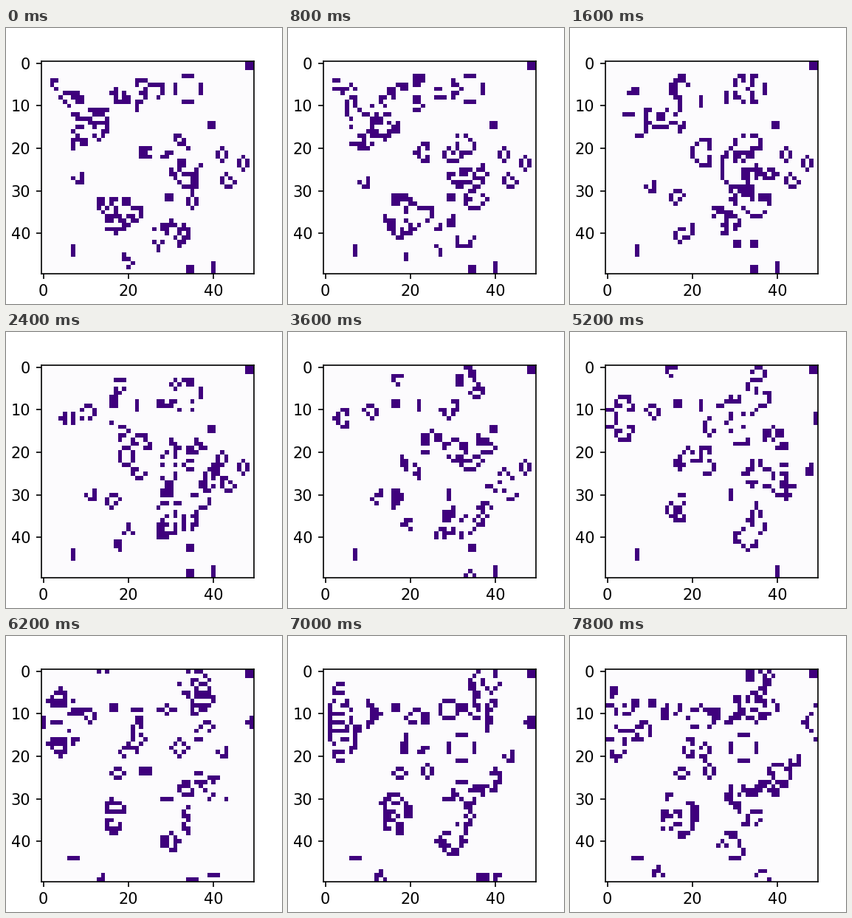
A matplotlib script that plays this animation: 374 px wide and 374 px high, repeating every 8000 ms.

```python
import matplotlib.pyplot as plt
import numpy as np
from matplotlib.animation import FuncAnimation

SIDE = 374
DPI = 150
SIZE = 50
STEPS = 40
STEP_MS = 200
WARM_UP = 5

# Small Life objects, rows parted by "/"
BAR = "OOO"
POLE = "O/O/O"
BLOCK = "OO/OO"
HIVE = ".O./O.O/O.O/.O."
LOAF = ".O../O.O./O..O/.OO."
GLIDER = "..O/O.O/.OO"

# Middles of the restless colonies (column, row)
COLONIES = [(7, 6), (16, 9), (25, 8), (11, 15), (28, 20),
            (34, 24), (17, 36), (31, 41), (17, 46)]


def next_board(board):
    """One Game of Life generation on a torus."""
    near = sum(np.roll(board, (dy, dx), axis=(0, 1))
               for dy in (-1, 0, 1) for dx in (-1, 0, 1) if dy or dx)
    return ((near == 3) | ((board == 1) & (near == 2))).astype(int)


def scatter(board, rng):
    """Random cells, thickest at the middle of each colony."""
    for middle in COLONIES:
        x, y = np.rint(rng.normal(middle, 2.3, (32, 2))).astype(int).T
        board[y % SIZE, x % SIZE] = 1


def put(board, shape, *spots):
    """Place a shape with its top-left corner at each spot."""
    rows = shape.split("/")
    for x, y in spots:
        for dy, row in enumerate(rows):
            for dx, mark in enumerate(row):
                board[(y + dy) % SIZE, (x + dx) % SIZE] = mark == "O"


def first_board():
    board = np.zeros((SIZE, SIZE), dtype=int)
    scatter(board, np.random.default_rng(7))
    for _ in range(WARM_UP):
        board = next_board(board)
    put(board, BLOCK, (48, 0), (39, 14), (29, 31), (34, 48))
    put(board, HIVE, (41, 20), (46, 22), (34, 31))
    put(board, LOAF, (42, 26))
    put(board, GLIDER, (7, 26))
    put(board, POLE, (7, 18), (7, 43), (40, 47))
    # Four blinkers in a ring
    for offset in (-3, 3):
        put(board, BAR, (33, 6 + offset))
        put(board, POLE, (34 + offset, 5))
    return board


boards = [first_board()]
while len(boards) < STEPS:
    boards.append(next_board(boards[-1]))

fig, ax = plt.subplots(figsize=(SIDE / DPI, SIDE / DPI), dpi=DPI)
image = ax.imshow(boards[0], cmap="Purples", vmin=0, vmax=1,
                  interpolation="nearest")
ax.set_xticks(range(0, SIZE, 20))
ax.set_yticks(range(0, SIZE, 10))


def draw(step):
    image.set_data(boards[step])
    return [image]


anim = FuncAnimation(fig, draw, frames=STEPS, interval=STEP_MS,
                     init_func=lambda: draw(0), repeat=True, repeat_delay=0)
plt.show()
```
